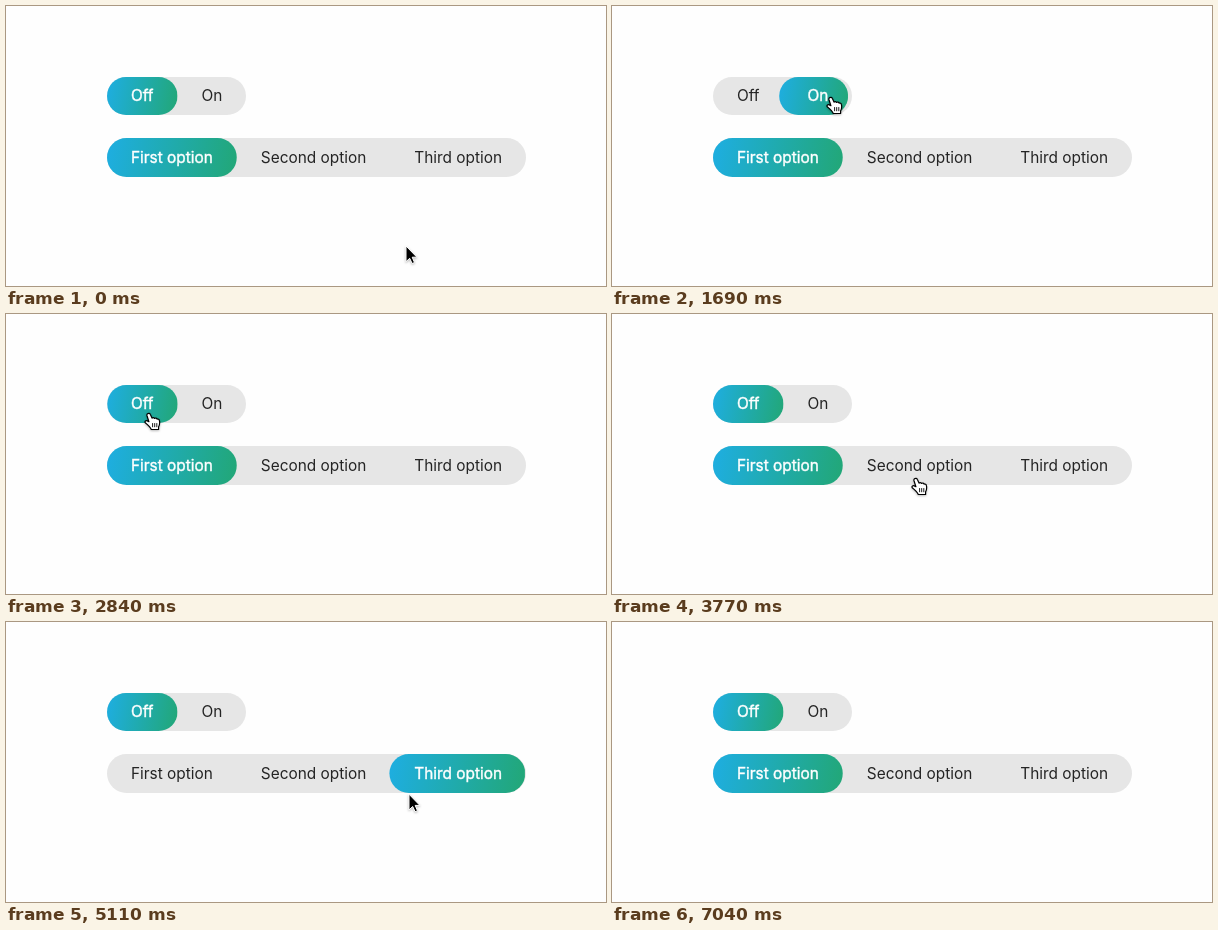
An HTML page for the animation above (7760 ms loop, 600 by 280 pixels).

```html
<!DOCTYPE html>
<html lang="en">
<head>
<meta charset="utf-8">
<title>Segmented switches</title>
<style>
  html, body { margin: 0; height: 100%; overflow: hidden; background: #fefefe; }
  .switch { position: absolute; left: 101px; border-radius: 20px; background: #e6e6e6;
    font: 15.4px Inter, "Open Sans", sans-serif; color: #242424; }
  .labels { display: flex; }
  .labels span { padding: 0 24px; white-space: pre; }
  .active { position: absolute; inset: 0; color: #fff; -webkit-text-stroke: .4px #fff;
    background: linear-gradient(100deg, #1eaee2, #22a776) no-repeat; }
  #cursor { position: absolute; left: 0; top: 0; overflow: visible;
    filter: drop-shadow(0 1px 1px #0004); }
</style>
</head>
<body>
<svg id="cursor" width="20" height="20" stroke-linejoin="round">
  <path id="arrow" d="M.5.5V16.2L4.2 12.8 6.6 18 9 17 6.7 11.7H11.4Z" stroke="#fff"/>
  <g id="hand" transform="translate(-5.7 -.5)" fill="#fff" stroke="#000" stroke-width="1.2" stroke-linecap="round">
    <path d="M3.2 1.3C4.3.4 5.6.8 6.1 2L7.7 5.6C8.2 4.8 9.8 4.8 10.3 6C11 5.2 12.5 5.4 12.9 6.7C13.8 6.2 15 6.8 15.2 8.4C15.6 11 15.3 12.8 14.3 14.4V17H7C6.2 15 4 12.6 .9 10.2C.2 8.8 1.6 7.8 3 8.4L4.6 9.2 2.7 3.2C2.5 2.4 2.7 1.7 3.2 1.3Z"/>
    <path d="M8.3 11V14.3M10.4 11V14.3M12.5 11V14.3" stroke-width=".9"/>
  </g>
</svg>
<script>
const LOOP = 7760, SLIDE = 340, CURSOR_GONE = 7040;
const $ = id => document.getElementById(id);
const cursor = $("cursor");

// Each click selects the next option, wrapping round.
const switches = [
  makeSwitch(71, 38, ["Off", "On"], [1455, 2530]),
  makeSwitch(132, 39, ["First option", "Second option", "Third option"], [3925, 4805, 6046])
];

// Cursor moves; bend is the sag of the path in px.
const home = { x: 399.5, y: 239.5 };
const moves = [
  { start: 390, end: 1050, x: 220, y: 91, bend: 0 },
  { start: 1720, end: 2210, x: 144, y: 99, bend: 0 },
  { start: 3110, end: 3770, x: 305, y: 164, bend: 8 },
  { start: 4050, end: 4640, x: 455, y: 165, bend: 2 },
  { start: 5020, end: 5580, x: 207, y: 170.5, bend: 9 },
  { start: 5610, end: 5810, x: 176, y: 160, bend: 0 },
  { start: 6730, end: 7130, x: 548, y: 290, bend: -60 }
];

function makeSwitch(top, height, labels, clicks) {
  const row = document.createElement("div");
  const spans = labels.map(label => `<span>${label}</span>`).join("");
  row.className = "switch";
  row.style.cssText = `top:${top}px; line-height:${height}px`;
  row.innerHTML = `<div class="labels">${spans}</div><div class="labels active">${spans}</div>`;
  cursor.before(row);
  const box = row.getBoundingClientRect();
  const pills = [...row.firstChild.children].map(span => {
    const { left, width } = span.getBoundingClientRect();
    return { x: left - box.left, width };
  });
  return { box, pills, clicks, active: row.lastChild };
}

const mix = (a, b, k) => a + (b - a) * k;

// CSS "ease" timing curve
function ease(p) {
  const curve = (b, c, s) => 3 * (1 - s) * s * ((1 - s) * b + s * c) + s ** 3;
  let lo = 0, hi = 1;
  for (let i = 0; i < 24; i++) {
    const mid = (lo + hi) / 2;
    if (curve(.25, .25, mid) < p) lo = mid; else hi = mid;
  }
  return curve(.1, 1, lo);
}

const progress = (t, start, end) =>
  ease(Math.max(0, Math.min(1, (t - start) / (end - start))));

function drawSwitch({ box, pills, clicks, active }, t) {
  let { x, width } = pills[0];
  clicks.forEach((click, i) => {
    const next = pills[(i + 1) % pills.length];
    const k = progress(t, click, click + SLIDE);
    x = mix(x, next.x, k);
    width = mix(width, next.width, k);
  });
  active.style.clipPath = `inset(0 ${box.width - x - width}px 0 ${x}px round 20px)`;
  active.style.backgroundSize = `${width}px 100%`;
  active.style.backgroundPosition = `${x}px 0`;
}

function drawCursor(t) {
  let { x, y } = home;
  for (const move of moves) {
    const k = progress(t, move.start, move.end);
    x = mix(x, move.x, k);
    y = mix(y, move.y, k) + move.bend * Math.sin(Math.PI * k);
  }
  const over = switches.some(({ box }) =>
    x >= box.left && x <= box.right && y >= box.top && y <= box.bottom);
  cursor.style.transform = `translate(${x}px, ${y}px)`;
  cursor.style.display = t < CURSOR_GONE ? "" : "none";
  $("hand").style.display = over ? "" : "none";
  $("arrow").style.display = over ? "none" : "";
}

const began = performance.now();
function tick() {
  const t = (performance.now() - began) % LOOP;
  switches.forEach(s => drawSwitch(s, t));
  drawCursor(t);
  requestAnimationFrame(tick);
}
tick();
</script>
</body>
</html>
```
